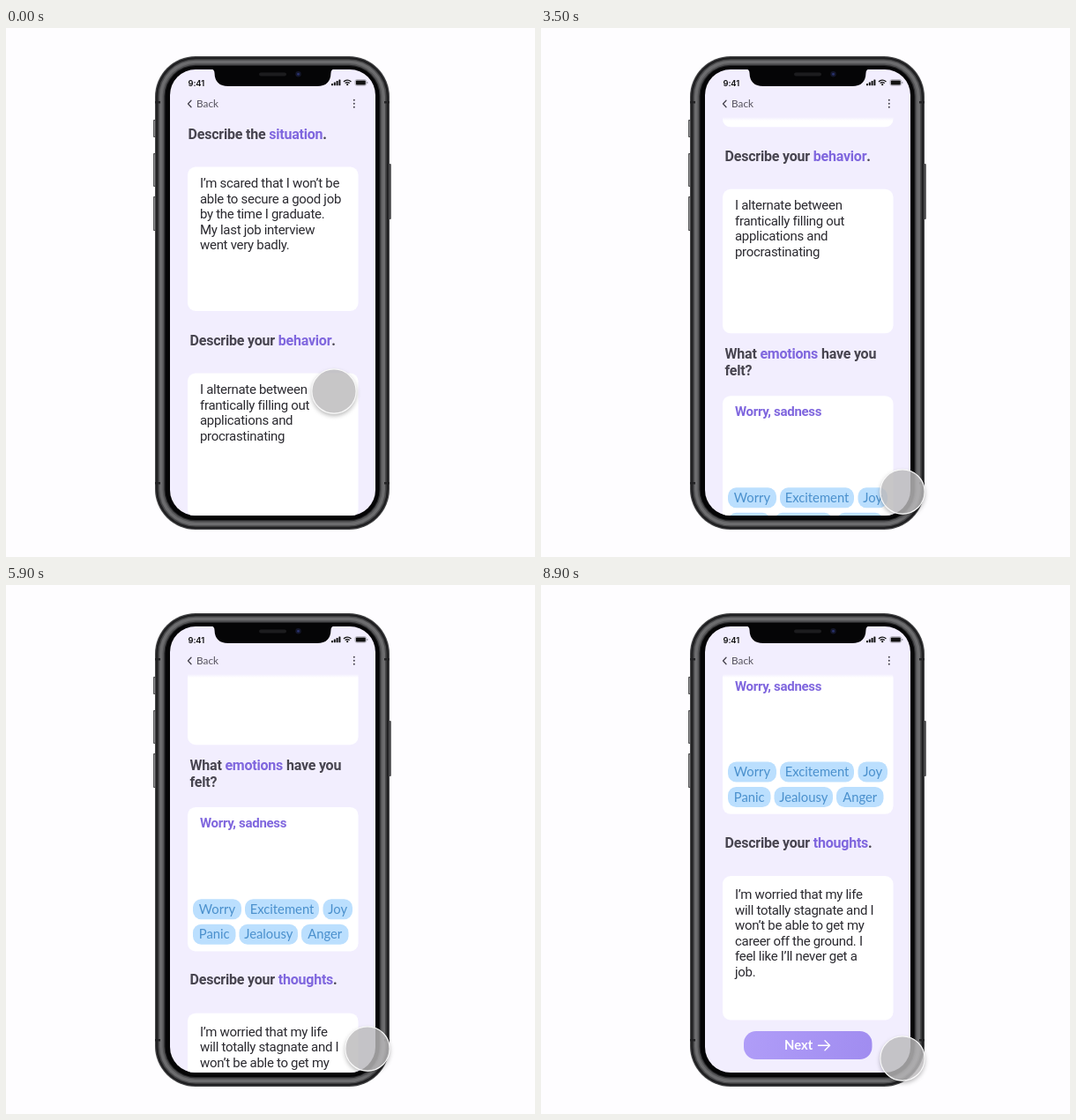
Animation, 600 px wide and 600 px high, one loop 9000 ms. Source, as an HTML page with a canvas:

```html
<!DOCTYPE html>
<html lang="en">
<head>
<meta charset="utf-8">
<title>Journal screen</title>
<style>
  html, body { margin: 0; width: 100%; height: 100%; overflow: hidden; background: #fefdff; }
  canvas { display: block; width: 600px; height: 600px; }
</style>
</head>
<body>
<canvas id="stage" width="600" height="600"></canvas>
<script>
const ctx = document.getElementById('stage').getContext('2d');
const LOOP = 9000, STEP = 100;
const INK = '#2b2a30', HEAD = '#47444f', ACCENT = '#7f66de', LILAC = '#f2eefe';
const BODY = '15px Roboto, sans-serif';
const BOLD = 'bold 15px Roboto, sans-serif';
const TITLE = 'bold 16px Roboto, sans-serif';
const ROUND = 'Lato, sans-serif';

// Easing
const sineInOut = u => (1 - Math.cos(Math.PI * u)) / 2;
const softOut = u => 1 - Math.pow(1 - u, 1.5);

function span(t, from, to, ease) {
  return ease(Math.min(1, Math.max(0, (t - from) / (to - from))));
}

function scrollAt(t) {
  return 264 * span(t, 2818, 3872, softOut)
    + 160 * span(t, 4750, 6600, sineInOut)
    + 105.5 * span(t, 7140, 8030, sineInOut);
}

function cursorAt(t) {
  const a = span(t, 230, 830, sineInOut);
  const b = span(t, 930, 1200, sineInOut);
  const c = span(t, 8720, 8900, sineInOut);
  return [372 + 35 * a + 3 * b, 412 + 90 * a + 24 * b + 11 * c];
}

// Drawing helpers
function box(x, y, w, h, r, fill) {
  ctx.beginPath();
  ctx.roundRect(x, y, w, h, r);
  ctx.fillStyle = fill;
  ctx.fill();
}

function disc(x, y, r, fill) {
  ctx.beginPath();
  ctx.arc(x, y, r, 0, 2 * Math.PI);
  ctx.fillStyle = fill;
  ctx.fill();
}

function line(points, color, width) {
  ctx.beginPath();
  points.forEach(([x, y]) => ctx.lineTo(x, y));
  ctx.strokeStyle = color;
  ctx.lineWidth = width;
  ctx.lineCap = ctx.lineJoin = 'round';
  ctx.stroke();
}

function text(str, x, y, font, color, spacing = 0, align = 'left') {
  ctx.font = font;
  ctx.letterSpacing = spacing + 'px';
  ctx.textAlign = align;
  ctx.fillStyle = color;
  ctx.fillText(str, x, y);
  return ctx.measureText(str).width;
}

function title(x, y, before, key, after) {
  x += text(before, x, y, TITLE, HEAD, -0.21);
  x += text(key, x, y, TITLE, ACCENT, -0.21);
  text(after, x, y, TITLE, HEAD, -0.21);
}

function paragraph(y, lines) {
  lines.forEach((s, i) => text(s, 220, y + i * 17.55, BODY, INK, -0.3));
}

const card = y => box(206, y, 193.5, 163.5, 9, '#fff');

function chip(x, right, y, label) {
  box(x, y - 11.5, right - x, 23, 9.5, '#bbdffe');
  text(label, (x + right) / 2, y + 5, '14.8px ' + ROUND, '#4a90cd', 0, 'center');
}

function body() {
  [[104, 20], [142, 38], [191, 39]].forEach(([y, h]) => {
    box(167, y, 4, h, 1, '#4a4a4c');
    box(167.8, y + 1, 1.2, h - 2, 0.6, '#939395');
  });
  box(433, 154, 3.8, 63, 1, '#4a4a4c');

  // Steel rim from the outside in, then the black bezel
  const shells = [
    [169, '#454547'],
    [170.2, '#1e1e20'],
    [172.3, '#48484a'],
    [174, '#6c6c6e'],
    [177.5, '#555557'],
    [179.3, '#2a2a2c'],
    [180.5, '#050506']
  ];
  shells.forEach(([x, c]) => {
    const inset = x - 169, y = 32 + inset * 0.95;
    box(x, y, 604 - 2 * x, 601 - 2 * y, 46 - inset, c);
  });
  for (const y of [83, 515]) {
    box(169, y, 6, 2.5, 0, '#222224');
    box(429, y, 6, 2.5, 0, '#222224');
  }
}

function content() {
  title(206.5, 125.5, 'Describe the ', 'situation', '.');
  card(157.5);
  paragraph(181, ['I’m scared that I won’t be', 'able to secure a good job',
    'by the time I graduate.', 'My last job interview', 'went very badly.']);

  title(208.5, 359.5, 'Describe your ', 'behavior', '.');
  card(391.5);
  paragraph(415, ['I alternate between', 'frantically filling out',
    'applications and', 'procrastinating']);

  title(208.5, 584, 'What ', 'emotions', ' have you');
  title(208.5, 602.5, 'felt?', '', '');
  card(625.8);
  text('Worry, sadness', 220, 649, BOLD, ACCENT, -0.3);
  chip(212, 267, 741.5, 'Worry');
  chip(271, 355, 741.5, 'Excitement');
  chip(359.5, 393, 741.5, 'Joy');
  chip(212, 260.5, 770, 'Panic');
  chip(264.5, 331, 770, 'Jealousy');
  chip(335, 388.5, 770, 'Anger');

  title(208.5, 827, 'Describe your ', 'thoughts', '.');
  card(859.5);
  paragraph(885.5, ['I’m worried that my life', 'will totally stagnate and I',
    'won’t be able to get my', 'career off the ground. I',
    'feel like I’ll never get a', 'job.']);

  const fill = ctx.createLinearGradient(230, 1035, 375, 1067);
  fill.addColorStop(0, '#b09df8');
  fill.addColorStop(1, '#a08cf0');
  box(230, 1035.5, 145.5, 32, 14, fill);
  text('Next', 276, 1056.5, 'bold 14.8px ' + ROUND, '#fff');
  line([[314.5, 1051.7], [327.5, 1051.7]], '#fff', 1.4);
  line([[322, 1046.2], [327.5, 1051.7], [322, 1057.2]], '#fff', 1.4);
}

// The scrolling page fades out just under the navigation bar
function headerFade() {
  const fade = ctx.createLinearGradient(0, 101, 0, 105);
  fade.addColorStop(0, LILAC);
  fade.addColorStop(1, 'rgba(242,238,254,0)');
  box(186, 100, 233, 5, 0, fade);
}

function notch() {
  ctx.beginPath();
  ctx.moveTo(232, 46);
  ctx.quadraticCurveTo(236.5, 47, 236.5, 51);
  ctx.quadraticCurveTo(237, 66, 252, 66);
  ctx.lineTo(353, 66);
  ctx.quadraticCurveTo(368, 66, 368.5, 51);
  ctx.quadraticCurveTo(368.5, 47, 373, 46);
  ctx.closePath();
  ctx.fillStyle = '#050506';
  ctx.fill();
  box(287, 50.5, 31, 4, 2, '#1c1c1e');
  disc(331.5, 52.3, 3.2, '#14172b');
  disc(331.5, 52.3, 1.4, '#2a3370');
}

function statusBar() {
  text('9:41', 206.5, 65.5, '600 9.4px Inter, sans-serif', '#111', -0.1);
  for (let i = 0; i < 4; i++) {
    const h = 2.2 + i * 1.5;
    box(369 + i * 2.8, 65.3 - h, 2, h, 0.5, '#111');
  }
  ctx.strokeStyle = '#111';
  ctx.lineWidth = 1.3;
  ctx.lineCap = 'butt';
  for (const r of [3.4, 5.8]) {
    ctx.beginPath();
    ctx.arc(387.2, 65, r, -Math.PI * 0.76, -Math.PI * 0.24);
    ctx.stroke();
  }
  disc(387.2, 64.2, 1.1, '#111');
  ctx.beginPath();
  ctx.roundRect(396, 58.6, 12.6, 6.6, 1.8);
  ctx.strokeStyle = '#8c8a93';
  ctx.lineWidth = 0.6;
  ctx.stroke();
  box(396.8, 59.4, 11, 5, 1, '#111');
  box(409.4, 60.9, 0.9, 2, 0.4, '#77757e');
}

function navBar() {
  line([[210, 82.3], [206.5, 86], [210, 89.7]], '#45424d', 1.3);
  text('Back', 216, 90, '11.8px ' + ROUND, '#55525d');
  for (const y of [81.7, 85.7, 89.7]) disc(394.8, y, 1, '#45424d');
}

function cursor(x, y) {
  const r = 25.5;
  ctx.save();
  ctx.beginPath();
  ctx.rect(0, 0, 600, 600);
  ctx.arc(x, y, r, 0, 2 * Math.PI);
  ctx.clip('evenodd');
  ctx.shadowColor = 'rgba(0,0,0,.28)';
  ctx.shadowBlur = 5;
  ctx.shadowOffsetY = 2.5;
  disc(x, y, r, '#fff');
  ctx.restore();
  disc(x, y, r, 'rgba(187,186,187,.82)');
  ctx.beginPath();
  ctx.arc(x, y, r - 0.4, 0, 2 * Math.PI);
  ctx.strokeStyle = 'rgba(255,255,255,.9)';
  ctx.lineWidth = 1.1;
  ctx.stroke();
}

function draw(t) {
  box(0, 0, 600, 600, 0, '#fefdff');
  body();
  ctx.save();
  ctx.beginPath();
  ctx.roundRect(186, 47, 233, 506, 29);
  ctx.clip();
  box(186, 47, 233, 506, 0, LILAC);
  ctx.save();
  ctx.beginPath();
  ctx.rect(186, 101, 233, 452);
  ctx.clip();
  ctx.translate(0, -scrollAt(t));
  content();
  ctx.restore();
  headerFade();
  statusBar();
  navBar();
  ctx.restore();
  notch();
  cursor(...cursorAt(t));
}

// The picture advances ten times a second
const start = performance.now();
function tick() {
  const t = (performance.now() - start) % LOOP;
  draw(Math.floor(t / STEP) * STEP);
  requestAnimationFrame(tick);
}
tick();
</script>
</body>
</html>
```
